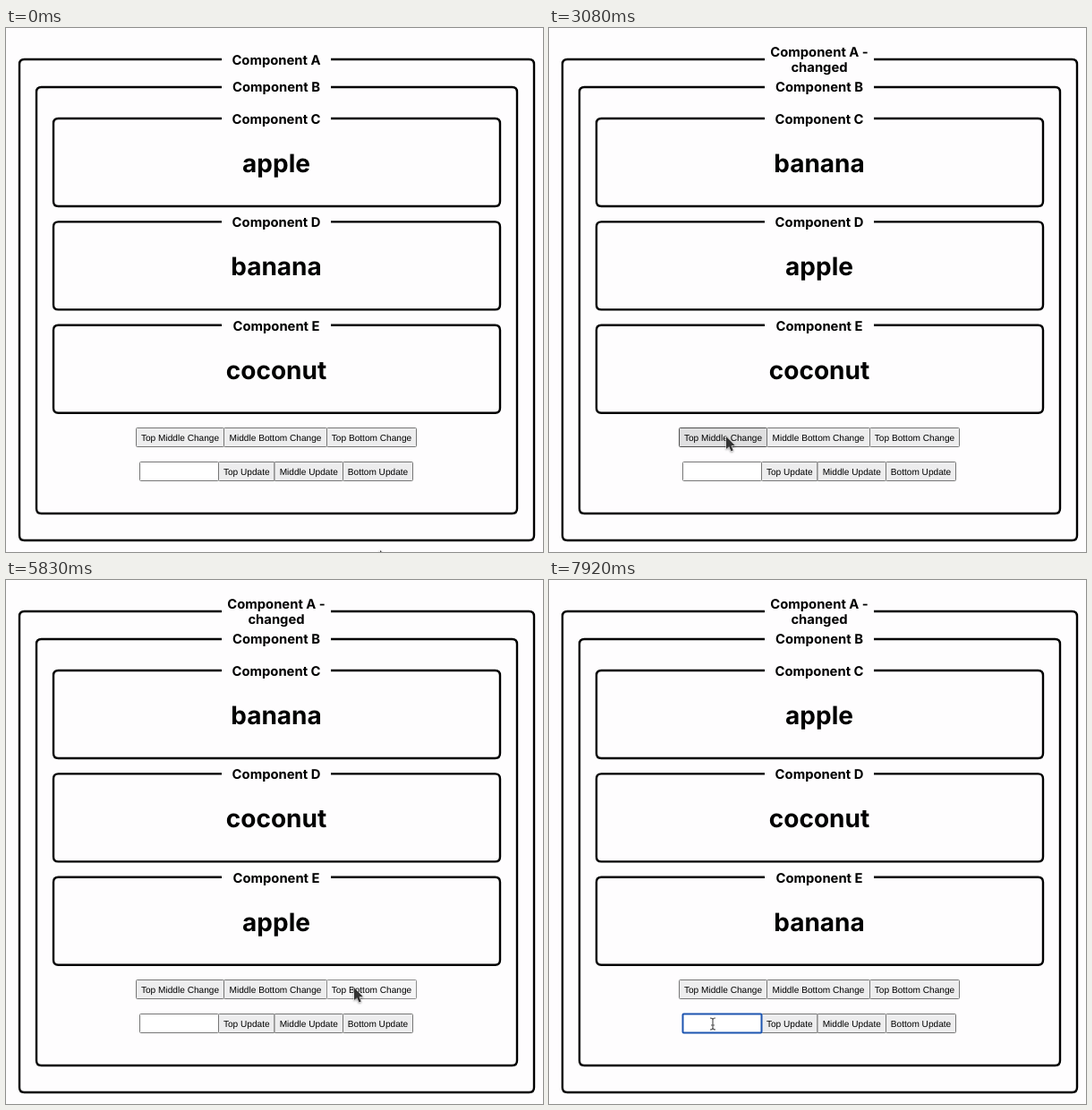
These frames come from a looping animation (600 by 585 pixels, 8000 ms). An HTML page:

```html
<!DOCTYPE html>
<html lang="en">
<head>
<meta charset="utf-8">
<title>Component changes</title>
<style>
  html, body { margin: 0; width: 100%; height: 100%; overflow: hidden; background: #fefdfe; }
  svg { display: block; }
  text { text-anchor: middle; text-rendering: geometricPrecision; font-optical-sizing: none; }
  .frame { fill: none; stroke: #000; stroke-width: 2.4; }
  .title { font: 700 14.8px Inter, sans-serif; }
  .word { font: 700 28px Inter, sans-serif; }
  .label { font: 10.12px "Liberation Sans", Arial, sans-serif; }
  .button rect { fill: #ededee; stroke: #767676; }
  .button.hover rect { fill: #dfdfe0; stroke: #4f4f4f; }
  .button.active rect { fill: #f5f5f6; stroke: #8d8d8d; }
  #input { fill: #fff; stroke: #767676; }
  #input.focus { stroke: #1d55b0; stroke-width: 2; }
  #arrow { fill: #333; stroke: #fff; stroke-width: 1; paint-order: stroke; filter: drop-shadow(0 1px 1px #0006); }
  #beam { fill: none; stroke: #555; stroke-width: 1.2; }
</style>
</head>
<body>
<svg id="stage" width="600" height="585" viewBox="0 0 600 585"></svg>
<script>
const stage = document.getElementById("stage");
const TICK = 1000 / 12, LOOP = 8000, CENTER = 302;

function add(tag, attrs, parent = stage, text = "") {
  const node = document.createElementNS("http://www.w3.org/2000/svg", tag);
  for (const name in attrs) node.setAttribute(name, attrs[name]);
  node.textContent = text;
  return parent.appendChild(node);
}

const addText = (cls, x, y, text, parent) => add("text", { class: cls, x, y }, parent, text);

// Rounded outline with an opening for the title in its top edge
function addFrame(left, top, right, bottom) {
  const r = 5.5;
  add("path", { class: "frame", d:
    `M241 ${top}H${left + r}Q${left} ${top} ${left} ${top + r}V${bottom - r}` +
    `Q${left} ${bottom} ${left + r} ${bottom}H${right - r}Q${right} ${bottom} ${right} ${bottom - r}` +
    `V${top + r}Q${right} ${top} ${right - r} ${top}H363` });
}

addFrame(15, 35, 590, 572);
addFrame(34, 66, 571, 542);
const titleA = addText("title", CENTER, 40.8, "");
const titleTail = addText("title", CENTER, 49, "");
addText("title", CENTER, 71.2, "Component B");

const words = ["C", "D", "E"].map((letter, i) => {
  const y = 115.4 * i;
  addFrame(53, 101 + y, 552, 199 + y);
  addText("title", CENTER, 107 + y, "Component " + letter);
  return addText("word", CENTER, 160.8 + y, "");
});

const HEIGHT = 21;
const buttons = [
  [145.5, 243.5, 446.5, "Top Middle Change"],
  [243.5, 358.5, 446.5, "Middle Bottom Change"],
  [358.5, 458.5, 446.5, "Top Bottom Change"],
  [237.5, 300, 484.5, "Top Update"],
  [300, 376.5, 484.5, "Middle Update"],
  [376.5, 454.5, 484.5, "Bottom Update"],
].map(([left, right, top, label]) => {
  const node = add("g", {});
  add("rect", { x: left, y: top, width: right - left, height: HEIGHT, rx: 1 }, node);
  addText("label", (left + right) / 2, top + 14.2, label, node);
  return { node, left, right, top };
});

const field = { left: 149.5, right: 237.5, top: 484.5 };
const input = add("rect", { id: "input", x: field.left, y: field.top, width: 88, height: HEIGHT, rx: 1 });
const caret = add("path", { d: "M154.5 488V501", stroke: "#000" });
const arrow = add("path", { id: "arrow", d: "M0 0V14L3.2 11.2L5.4 16.6L7.8 15.6L5.6 10.3H10Z" });
const beam = add("path", { id: "beam", d: "M-3 -6Q0 -6 0 -4Q0 -6 3 -6M0 -4V5M-3 7Q0 7 0 5Q0 7 3 7M-2 2H2" });

// Pointer stops: tick, x, y
const route = [
  [0, 418, 583], [9, 136, 453], [14, 136, 453], [15, 138, 452], [19, 197, 456],
  [36, 197, 456], [37, 198, 456], [42, 298, 459], [58, 298, 459], [59, 302, 460],
  [63, 386, 456], [65, 386, 456], [68, 389, 455], [80, 389, 455], [81, 360, 458],
  [88, 183, 495], [96, 183, 495],
];
// Word order from each tick on
const orders = [
  [0, "apple banana coconut"], [28, "banana apple coconut"],
  [51, "banana coconut apple"], [72, "apple coconut banana"],
];
const presses = [[27, 28], [50, 51], [70, 72]];

function pointerAt(tick) {
  const i = route.findIndex(stop => stop[0] > tick);
  const [t0, x0, y0] = route[i - 1], [t1, x1, y1] = route[i];
  const p = (tick - t0) / (t1 - t0), eased = p * (2 - p);
  return [x0 + (x1 - x0) * eased, y0 + (y1 - y0) * eased];
}

function draw(time) {
  const tick = Math.floor((time % LOOP + 5) / TICK) % 96;
  const [x, y] = pointerAt(tick);
  const inside = box => x >= box.left && x < box.right && y >= box.top && y <= box.top + HEIGHT;
  const show = (node, visible) => node.setAttribute("visibility", visible ? "visible" : "hidden");

  const changed = tick >= 28;
  titleA.textContent = changed ? "Component A -" : "Component A";
  titleA.setAttribute("y", changed ? 31.8 : 40.8);
  titleTail.textContent = changed ? "changed" : "";
  const order = orders.findLast(([start]) => start <= tick)[1].split(" ");
  words.forEach((word, i) => word.textContent = order[i]);

  const pressed = presses.some(([down, up]) => tick >= down && tick < up);
  for (const button of buttons) {
    const state = inside(button) ? (pressed ? " active" : " hover") : "";
    button.node.setAttribute("class", "button" + state);
  }

  input.setAttribute("class", tick >= 90 ? "focus" : "");
  show(caret, tick >= 90 && tick < 95);
  const typing = inside(field);
  show(arrow, !typing);
  show(beam, typing);
  for (const node of [arrow, beam]) node.setAttribute("transform", `translate(${x} ${y})`);
}

const start = performance.now();
function loop() {
  draw(performance.now() - start);
  requestAnimationFrame(loop);
}
loop();
</script>
</body>
</html>
```
